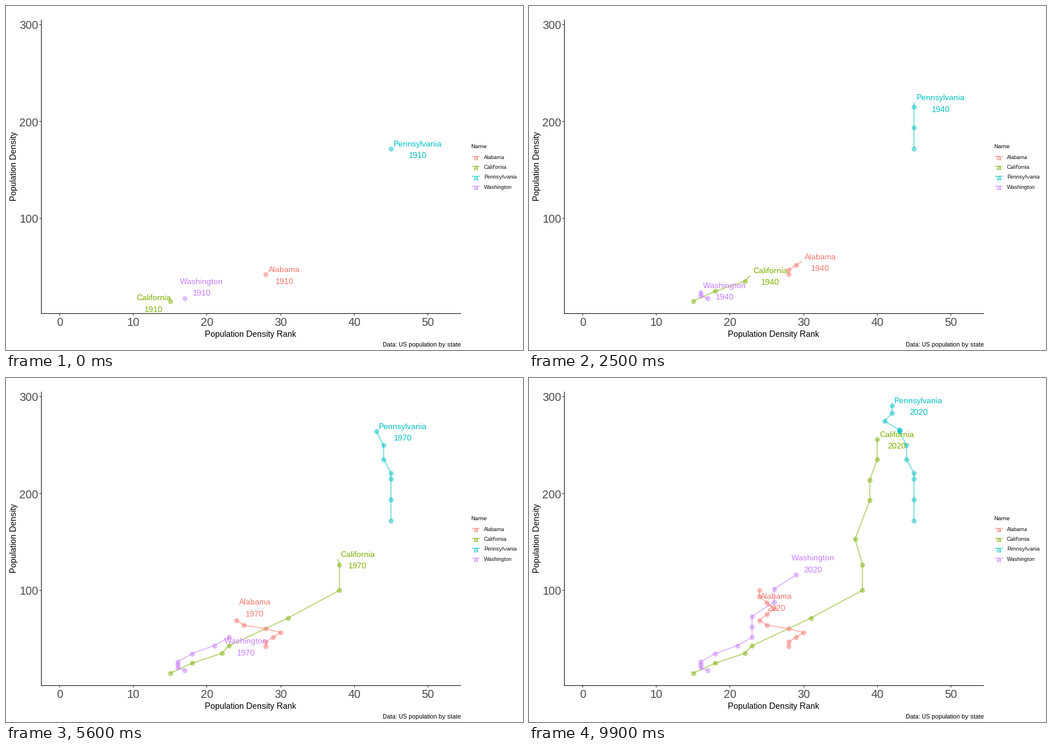
A matplotlib script for the animation above (10 s loop, 900x600 px).

```python
import matplotlib.pyplot as plt
import numpy as np
from matplotlib.animation import FuncAnimation

W, H, DPI = 900, 600, 100
PX = 72 / DPI
DECADES, STEPS = 11, 9
LABEL_SIZE = 14.2

# Key points: decades since 1910, density rank, density
TRENDS = {
    "Alabama": ("#F8766D", [(0, 27.55, 42), (3, 30.2, 56.5), (5.4, 23.9, 65.5),
                            (8, 26.2, 81), (11, 23.55, 100)]),
    "California": ("#7CAE00", [(0, 15.3, 14.5), (2, 21.6, 35), (3, 23.2, 42.8),
                               (5, 38, 100), (7, 37.2, 153), (8, 38.8, 193),
                               (11, 40.3, 256)]),
    "Pennsylvania": ("#00BFC4", [(0, 45, 172), (2, 45, 215), (3, 44.6, 221),
                                 (6, 43.2, 264), (8, 42.6, 265.6),
                                 (9, 41.4, 274.5), (11, 42.4, 291)]),
    "Washington": ("#C77CFF", [(0, 16.6, 17.4), (3, 15.6, 26.3), (6, 23.1, 51.4),
                               (8, 23.4, 73.2), (9, 25.8, 88), (10, 26.4, 101.5),
                               (11, 29, 115.9)]),
}

plt.rcParams.update({"font.family": "Liberation Sans",
                     "text.hinting": "default", "text.hinting_factor": 1})
fig = plt.figure(figsize=(W / DPI, H / DPI), dpi=DPI, facecolor="white")
ax = fig.add_axes([0, 0, 1, 1])
ax.set_xlim(0, W)
ax.set_ylim(H, 0)
ax.axis("off")


def px(rank):
    return 93.7 + 12.81 * rank


def py(density):
    return 32.3 + 1.69 * (300 - density)


def text(x, y, s, size, color="black", ha="center", **kw):
    kw.setdefault("va", "baseline")
    return ax.text(x, y, s, size=size * PX, color=color, ha=ha, **kw)


def rule(x, y, color="black", width=1, **kw):
    return ax.plot(x, y, color=color, lw=width * PX, snap=False,
                   solid_capstyle="butt", **kw)[0]


def draw_axes():
    for value in (100, 200, 300):
        y = int(py(value)) + 0.5
        rule([58, 61], [y, y], "#333333")
        text(56.5, y + 8, str(value), 20, "#4D4D4D", "right")
    for value in range(0, 51, 10):
        x = int(px(value)) + 0.5
        rule([x, x], [537, 540], "#333333")
        text(px(value), 558, str(value), 20, "#4D4D4D")
    rule([61.5, 61.5], [24, 537])
    rule([61, 792], [536.5, 536.5])
    text(426, 577, "Population Density Rank", 14.5)
    text(14.5, 279.5, "Population Density", 14.5, va="center", rotation=90)
    text(792, 593.5, "Data: US population by state", 10.6, ha="right")


class State:
    def __init__(self, name, color, keys):
        when, rank, density = np.array(keys).T
        decades = np.arange(DECADES + 1)
        self.xs = px(np.round(np.interp(decades, when, rank)))
        self.ys = py(np.interp(decades, when, density))
        self.line = rule([], [], color, 2, alpha=0.5, zorder=3)
        self.dots = ax.plot([], [], "o", color=color, ms=8.8 * PX, mew=0,
                            alpha=0.5, snap=False, zorder=4)[0]
        self.name = text(0, 0, name, LABEL_SIZE, color, zorder=5)
        self.year = text(0, 0, "", LABEL_SIZE, color, zorder=5)
        self.half = self.name.get_window_extent().width / 2

    def reveal(self, t):
        k = int(t)
        decades = np.arange(DECADES + 1)
        self.x = np.interp(t, decades, self.xs)
        self.y = np.interp(t, decades, self.ys)
        self.dots.set_data(self.xs[:k + 1], self.ys[:k + 1])
        self.line.set_data([*self.xs[:k + 1], self.x], [*self.ys[:k + 1], self.y])

    def crowds(self, other):
        """Would both labels collide if each stood right of its tip?"""
        gap = abs(self.x + self.half - other.x - other.half)
        return gap < self.half + other.half + 10 and abs(self.y - other.y) < 38

    def place_label(self, others, year):
        # Crowded labels part: the higher one up, the lower one down.
        near = [o for o in others if self.crowds(o)]
        push = np.sign(sum(np.sign(self.y - o.y) for o in near))
        if push:
            blocked = any(0 < o.x - self.x < 28 and abs(o.y - self.y) < 9
                          for o in near)
            dx, dy = (-29 if blocked else 29), 20 * push
        else:
            dx, dy = self.half + 4.5, 1
        cx, cy = self.x + dx, min(self.y + dy, 518)
        self.name.set_position((cx, cy - 5))
        self.year.set_position((cx, cy + 15.5))
        self.year.set_text(str(year))


def draw_legend():
    text(809, 248, "Name", 10.3, ha="left")
    for k, (name, (color, _)) in enumerate(TRENDS.items()):
        y = 262.5 + 17.28 * k
        rule([811, 825], [y, y], color, 2, alpha=0.5)
        text(817, y + 6.5, "a", LABEL_SIZE, color)
        text(832, y + 4.3, name, 9.4, ha="left")


draw_axes()
draw_legend()
states = [State(name, *trend) for name, trend in TRENDS.items()]


def draw(i):
    t = i / STEPS
    for s in states:
        s.reveal(t)
    for s in states:
        s.place_label([o for o in states if o is not s], 1910 + 10 * int(t + 0.5))
    return []


anim = FuncAnimation(fig, draw, frames=DECADES * STEPS + 1,
                     init_func=lambda: draw(0), interval=100,
                     repeat=True, repeat_delay=0)
plt.show()
```
